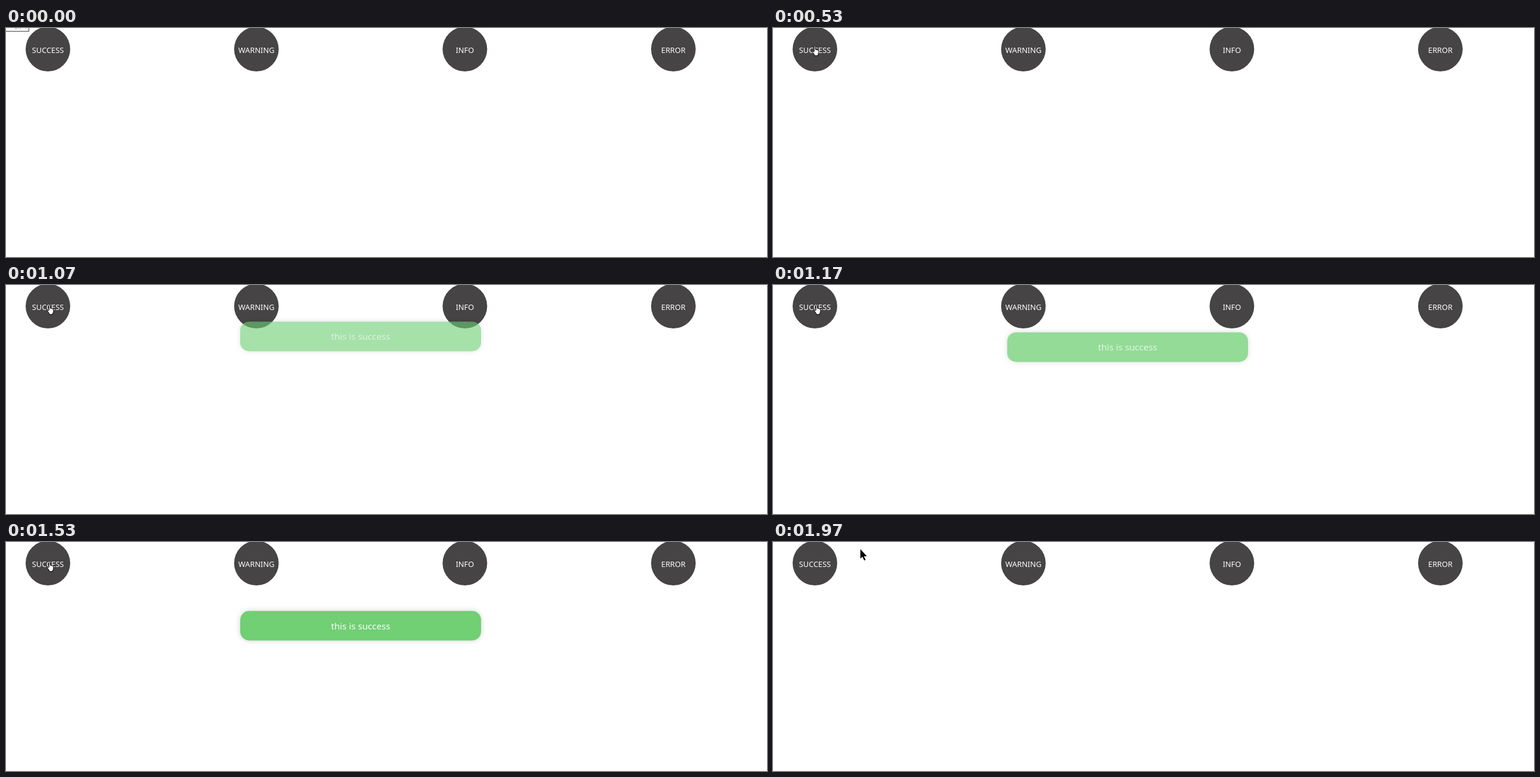
An HTML page with a canvas for the animation above (2.01 s loop, 1280 px wide and 385 px high).

```html
<!DOCTYPE html>
<html lang="en">
<head>
<meta charset="utf-8">
<title>Toast messages</title>
<style>
html, body { margin: 0; width: 100%; height: 100%; overflow: hidden; background: #fff; }
canvas { display: block; }
</style>
</head>
<body>
<canvas id="stage" width="1280" height="385"></canvas>
<script>
const LOOP = 2010;
const ctx = document.getElementById('stage').getContext('2d');
const SANS = '"Noto Sans", "Open Sans", sans-serif';

const labels = ['SUCCESS', 'WARNING', 'INFO', 'ERROR'];
const button = { x: 70.5, y: 35.5, r: 37.5, gap: 350.67 };
const toast = { x: 394, w: 405, h: 49.5, r: 15, from: 810, to: 1850 };

// Keys are [time, value, ...]
const toastKeys = [[810, .44], [930, .53], [1070, .61], [1170, .73], [1300, .853],
  [1400, .915], [1530, .973], [1600, .988], [1700, 1]];
const pointerKeys = [[200, 28, -22], [330, 48, 8], [450, 68, 28], [530, 70, 30],
  [640, 70, 30], [760, 73, 33], [1680, 73, 33], [1930, 147, 12]];

const arrow = new Path2D('M0 0v16l3.4-3.2 3 6.2 2.4-1.1-2.9-5.9h5z');
const hand = new Path2D('M3.2 9.6V1.8a1.2 1.2 0 0 1 2.4 0V6.2q1.6-.6 2 .6 1.4-.4 1.8.7 ' +
  '1.5-.1 1.5 1.3v3.4l-1.4 2.8v1.6H4.2L3.7 15 .8 10.6q-.5-1.4.9-1.4z');

function track(keys, t) {
  const last = keys[keys.length - 1];
  if (t <= keys[0][0]) return keys[0].slice(1);
  if (t >= last[0]) return last.slice(1);
  const i = keys.findIndex(k => k[0] > t);
  const a = keys[i - 1], b = keys[i];
  const u = (t - a[0]) / (b[0] - a[0]);
  return a.slice(1).map((v, n) => v + (b[n + 1] - v) * u);
}

function text(str, x, y, size, color, align = 'center', family = SANS) {
  ctx.font = `${size}px ${family}`;
  ctx.textAlign = align;
  ctx.fillStyle = color;
  ctx.fillText(str, x, y);
}

function drawButtons() {
  labels.forEach((label, i) => {
    const x = button.x + i * button.gap;
    ctx.beginPath();
    ctx.arc(x, button.y, button.r, 0, Math.PI * 2);
    ctx.fillStyle = '#464445';
    ctx.fill();
    text(label, x, 41.5, 12.8, '#fff');
  });
}

function drawHint() {
  ctx.fillStyle = '#fff';
  ctx.fillRect(-2, -2, 41, 8);
  ctx.strokeStyle = '#444';
  ctx.lineWidth = 1;
  ctx.strokeRect(-2.5, -2.5, 41, 8);
  text('停止录入', 34, 0, 11, '#333', 'right', '"Noto Sans CJK SC", "Noto Sans CJK", sans-serif');
}

function drawToast(t) {
  const [p] = track(toastKeys, t);
  const { x, w, h, r } = toast;
  const y = -30 + 150 * p;
  const box = new Path2D();
  box.roundRect(x, y, w, h, r);
  const outside = new Path2D();
  outside.rect(0, 0, 1280, 385);
  outside.addPath(box);

  ctx.save();
  ctx.globalAlpha = p;
  ctx.fillStyle = '#6dce71';

  // Keep the shadow from showing through the translucent box
  ctx.save();
  ctx.clip(outside, 'evenodd');
  ctx.shadowColor = 'rgba(0,0,0,.2)';
  ctx.shadowBlur = 10;
  ctx.fill(box);
  ctx.restore();

  ctx.fill(box);
  text('this is success', x + w / 2, y + 30.7, 15.2, '#fff');
  ctx.restore();
}

function drawPointer(t) {
  const [x, y] = track(pointerKeys, t);
  const over = Math.hypot(x - button.x, y - button.y) < button.r;
  ctx.save();
  ctx.translate(Math.round(x) - (over ? 4 : 0), Math.round(y));
  ctx.lineJoin = 'round';
  if (over) {
    ctx.fillStyle = '#fff';
    ctx.strokeStyle = '#000';
    ctx.lineWidth = 1;
    ctx.fill(hand);
    ctx.stroke(hand);
  } else {
    ctx.strokeStyle = '#fff';
    ctx.lineWidth = 2;
    ctx.stroke(arrow);
    ctx.fillStyle = '#000';
    ctx.fill(arrow);
  }
  ctx.restore();
}

function draw(t) {
  ctx.fillStyle = '#fff';
  ctx.fillRect(0, 0, 1280, 385);
  drawButtons();
  if (t < 100) drawHint();
  if (t >= toast.from && t < toast.to) drawToast(t);
  drawPointer(t);
}

const start = performance.now();
function tick() {
  draw((performance.now() - start) % LOOP);
  requestAnimationFrame(tick);
}
tick();
</script>
</body>
</html>
```
